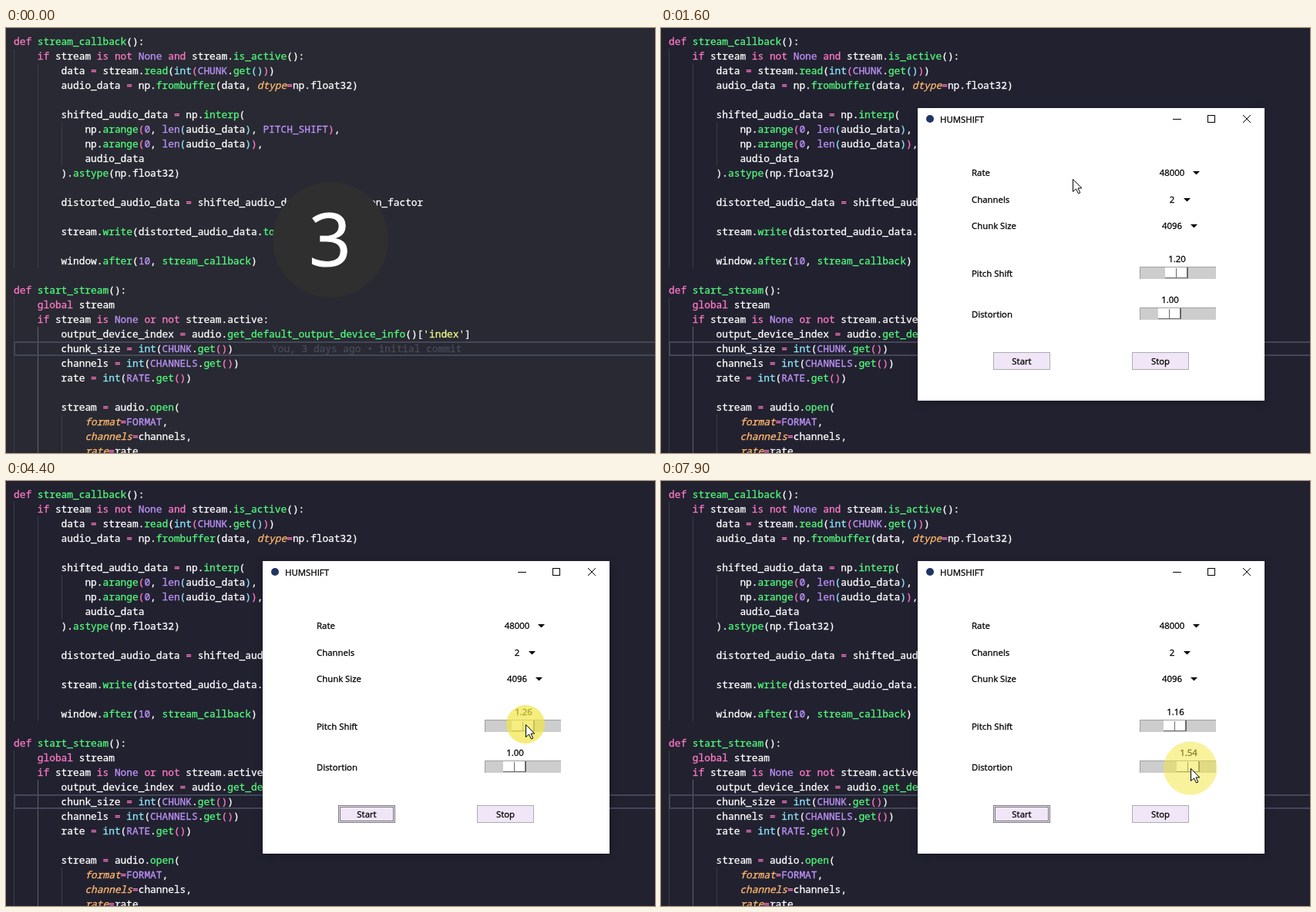
An HTML page with a canvas that plays this animation: 842 by 552 pixels, repeating every 8000 ms.

```html
<!DOCTYPE html>
<html lang="en">
<head>
<meta charset="utf-8">
<title>Audio demo</title>
<style>
html, body { margin: 0; width: 100%; height: 100%; overflow: hidden; background: #222130; }
canvas { display: block; }
</style>
</head>
<body>
<canvas id="stage" width="842" height="552"></canvas>
<script>
const c = document.getElementById('stage').getContext('2d');
const MONO = '12.83px "Noto Sans Mono", "DejaVu Sans Mono", monospace';
const SANS = 'px "Open Sans", "Noto Sans", sans-serif';
const UI = 11.4 + SANS;
const LOOP = 8000, STEP = 100, CHAR = 7.7, LINE = 19;
const PINK = '#ff79c6', GREEN = '#50fa7b', CYAN = '#8be9fd', PURPLE = '#bd93f9', WHITE = '#fff';

const code = `def stream_callback():
    if stream is not None and stream.is_active():
        data = stream.read(int(CHUNK.get()))
        audio_data = np.frombuffer(data, dtype=np.float32)

        shifted_audio_data = np.interp(
            np.arange(0, len(audio_data), PITCH_SHIFT),
            np.arange(0, len(audio_data)),
            audio_data
        ).astype(np.float32)

        distorted_audio_data = shifted_audio_data * distortion_factor

        stream.write(distorted_audio_data.tobytes())

        window.after(10, stream_callback)

def start_stream():
    global stream
    if stream is None or not stream.active:
        output_device_index = audio.get_default_output_device_info()['index']
        chunk_size = int(CHUNK.get())
        channels = int(CHANNELS.get())
        rate = int(RATE.get())

        stream = audio.open(
            format=FORMAT,
            channels=channels,
            rate=rate,`.split('\n');

// Pointer moves: start, end, x, y; it rests in between
const moves = [
  [200, 400, 548, 248],
  [500, 1400, 550, 118],
  [1500, 2100, 488, 430],
  [2300, 2500, 492, 428],
  [2600, 3100, 671.6, 316],
  [3200, 3600, 677, 316],
  [3600, 3800, 689, 316],
  [4100, 4200, 694, 316],
  [4200, 4500, 669.8, 316],
  [4600, 4800, 667.3, 371],
  [5100, 5300, 653, 371],
  [5600, 5700, 657, 371],
  [5700, 5900, 652.3, 371],
  [6300, 6500, 676, 371],
  [6500, 6650, 655, 371],
  [7400, 7800, 686.7, 373]
];
// Mouse button: down, up
const titleDrag = [500, 1400], startClick = [2300, 2380];
const pitchDrags = [[3200, 4500]];
const distortionDrags = [[5100, 5700], [6300, 6680], [7400, 7800]];
const presses = [titleDrag, startClick, ...pitchDrags, ...distortionDrags];

const clamp = (v, lo, hi) => Math.min(hi, Math.max(lo, v));

function pointer(t) {
  let x = 327, y = 227;
  for (const [start, end, toX, toY] of moves) {
    const u = 1 - (1 - clamp((t - start) / (end - start), 0, 1)) ** 1.58;
    x += (toX - x) * u;
    y += (toY - y) * u;
  }
  return [x, y];
}

// A slider follows the pointer's travel while it is held
const PER_UNIT = 44.7;
function dragged(value, drags, t) {
  for (const [down, up] of drags) {
    value += (pointer(clamp(t, down, up))[0] - pointer(down)[0]) / PER_UNIT;
  }
  return value;
}

function box(x, y, w, h, fill) {
  c.fillStyle = fill;
  c.fillRect(x, y, w, h);
}

function frame(x, y, w, h, color, line = 1) {
  c.strokeStyle = color;
  c.lineWidth = line;
  c.strokeRect(x + line / 2, y + line / 2, w - line, h - line);
}

// A hairline outline gives the text its weight
function text(s, x, y, align = 'left', color = '#000', font = UI, weight = 0.3) {
  c.font = font;
  c.textAlign = align;
  c.fillStyle = c.strokeStyle = color;
  c.lineWidth = weight;
  c.fillText(s, x, y);
  c.strokeText(s, x, y);
}

function disc(x, y, r, fill) {
  c.fillStyle = fill;
  c.beginPath();
  c.arc(x, y, r, 0, 7);
  c.fill();
}

function colorOf(word, rest) {
  if (/^(def|if|is|not|and|or|global|=|\*)$/.test(word)) return PINK;
  if (word === 'int') return CYAN;
  if (/^(len|None|[A-Z_]+|\d+)$/.test(word)) return PURPLE;
  if (word[0] === "'") return '#f1fa8c';
  if (word === 'stream_callback' || /^\w/.test(word) && rest[0] === '(') return GREEN;
  return WHITE;
}

function drawGuides() {
  code.forEach((line, row) => {
    const indent = (line || code[row + 1]).search(/\S/);
    for (let col = 0; col < indent; col += 4) {
      const active = col === 4 && row > 19;
      box(Math.round(10 + col * CHAR), 8 + row * LINE, 1, LINE, active ? '#62636e' : '#3b3c48');
    }
  });
}

function drawCode() {
  drawGuides();
  frame(10, 407, 840, 19, '#44475a', 2);
  text('You, 3 days ago • initial commit', 345, 421, 'left', '#484b59', MONO);

  let depth = 0;
  code.forEach((line, row) => {
    for (const m of line.matchAll(/'[^']*'|\w+|[^\w\s]/g)) {
      const word = m[0], rest = line.slice(m.index + word.length);
      const named = /^\w/.test(word) && rest[0] === '=';
      let color = named ? '#ffb86c' : colorOf(word, rest);
      if (/[)\]]/.test(word)) depth--;
      if (/[()[\]]/.test(word)) color = [WHITE, PINK, CYAN][depth % 3];
      if (/[([]/.test(word)) depth++;
      text(word, 10 + m.index * CHAR, 22 + row * LINE, 'left', color, (named ? 'italic ' : '') + MONO);
    }
  });
}

function drawSlider(label, y, value) {
  const mid = Math.round(637.5 + (value - 0.5) * PER_UNIT);
  text(label, 403, y + 13);
  text(value.toFixed(2), mid + 0.5, y - 6, 'center');
  box(621, y, 99, 16, '#a0a0a0');
  box(622, y + 1, 98, 15, '#cdcdcd');
  box(mid - 15, y + 1, 30, 14, '#696969');
  box(mid - 15, y + 1, 28, 13, '#fff');
  box(mid - 1, y + 2, 1, 12, '#696969');
}

function drawButton(label, x, hover, focus) {
  box(x, 421, 74, 23, hover ? '#d8f4f8' : '#f0e6f8');
  frame(x, 421, 74, 23, focus ? '#777' : '#adadad');
  if (focus) {
    c.setLineDash([1, 1]);
    frame(x + 2, 423, 70, 19, '#000');
    c.setLineDash([]);
  }
  text(label, x + 37, 437, 'center');
}

function drawOption(label, value, y, arrow) {
  text(label, 403, y);
  text(value, 663, y, 'center');
  c.fillStyle = '#000';
  c.beginPath();
  c.moveTo(arrow, y - 6);
  c.lineTo(arrow + 9, y - 6);
  c.lineTo(arrow + 4.5, y - 1.5);
  c.fill();
}

function drawTitleBar() {
  disc(349, 118, 5, '#1f3566');
  text('HUMSHIFT', 362, 123);
  box(664, 118, 11, 1, '#000');
  frame(709, 113, 10, 10, '#000');
  c.beginPath();
  c.moveTo(755, 113);
  c.lineTo(765, 123);
  c.moveTo(765, 113);
  c.lineTo(755, 123);
  c.stroke();
}

// Laid out at its resting place, then shifted with the title drag
function drawWindow(t, [mx, my]) {
  const [gx, gy] = pointer(clamp(t, ...titleDrag));
  c.save();
  c.translate(Math.round(gx - 550), Math.round(gy - 118));
  c.shadowColor = 'rgba(0,0,0,.28)';
  c.shadowBlur = 10;
  c.shadowOffsetY = 2;
  box(333, 104, 450, 380, '#fff');
  c.shadowColor = 'transparent';

  drawTitleBar();
  drawOption('Rate', '48000', 192, 690);
  drawOption('Channels', '2', 227, 678);
  drawOption('Chunk Size', '4096', 261, 687);
  drawSlider('Pitch Shift', 310, dragged(1.2, pitchDrags, t));
  drawSlider('Distortion', 363, dragged(1, distortionDrags, t));

  const hover = mx > 431 && mx < 505 && my > 421 && my < 444;
  drawButton('Start', 431, hover, t >= startClick[0]);
  drawButton('Stop', 611, false, false);
  c.restore();
}

// Yellow spot while held, growing and fading after release
function drawPress(t) {
  for (const [down, up] of presses) {
    const s = Math.max(0, t - up) / 1000;
    if (t <= down || s >= 0.2) continue;
    const [x, y] = pointer(Math.min(t, up));
    const warm = clamp((s - 0.1) / 0.02, 0, 1);
    const alpha = 0.7 * (1 - (s / 0.2) ** 2);
    disc(x, y, 25 + 98 * s, `rgba(${241 + 14 * warm},${230 - 15 * warm},70,${alpha})`);
  }
}

function drawCursor(x, y) {
  c.save();
  c.translate(x + 0.5, y + 0.5);
  c.fillStyle = '#fff';
  c.strokeStyle = '#000';
  c.lineWidth = 1;
  const arrow = new Path2D('M0 0V16L4 12.5 7 18.5 9.3 17.5 6.5 11.5H11.3Z');
  c.fill(arrow);
  c.stroke(arrow);
  c.restore();
}

function draw(now) {
  const t = Math.floor(now % LOOP / STEP) * STEP;
  const intro = t < 100;
  box(0, 0, 842, 552, intro ? '#282932' : '#222130');
  drawCode();
  if (intro) {
    disc(421, 275, 75, '#2f2f2f');
    text('3', 420.5, 309, 'center', WHITE, 96 + SANS, 1);
  } else {
    const mouse = pointer(t).map(Math.round);
    drawWindow(t, mouse);
    drawPress(t);
    drawCursor(...mouse);
  }
}

const start = performance.now();
function tick() {
  draw(performance.now() - start);
  requestAnimationFrame(tick);
}
tick();
</script>
</body>
</html>
```
